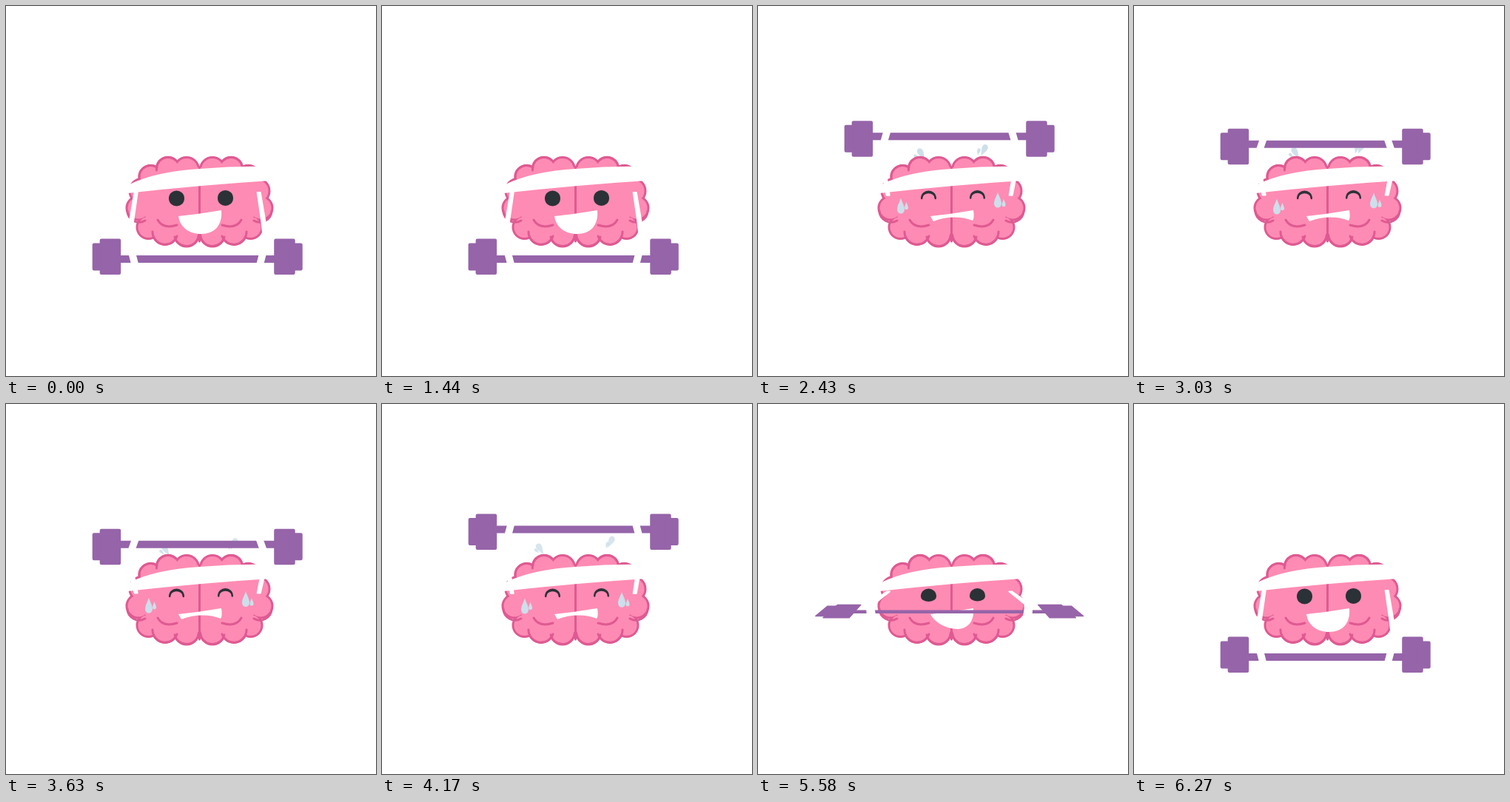
Animation, 500 px wide and 500 px high, one loop 6.3 s. Source, as an HTML page with a canvas:

```html
<!DOCTYPE html>
<html>
<head>
<meta charset="utf-8">
<title>Brain workout</title>
<style>
html, body { margin: 0; width: 100%; height: 100%; overflow: hidden; background: #fff; }
canvas { display: block; width: 500px; height: 500px; }
</style>
</head>
<body>
<canvas id="stage"></canvas>
<script>
const LOOP = 6300, CENTER = 258.7, AXIS = 254, DEPTH = 455, MID = 261.5;
const PINK = '#fe8bb3', ROSE = '#df5a92', PURPLE = '#9664a9', INK = '#2b3237', WATER = '#cddfea';

const canvas = document.getElementById('stage');
const ratio = window.devicePixelRatio || 1;
canvas.width = canvas.height = 500 * ratio;
const ctx = canvas.getContext('2d');

const clamp = v => Math.min(1, Math.max(0, v));
const ramp = (t, from, to) => clamp((t - from) / (to - from));
const smooth = p => (1 - Math.cos(Math.PI * p)) / 2;
const mix = (a, b, k) => a + (b - a) * k;

function fill(path, color) {
  ctx.fillStyle = color;
  ctx.fill(path);
}

function stroke(path, color, width) {
  ctx.strokeStyle = color;
  ctx.lineWidth = width;
  ctx.stroke(path);
}

// Lobes of one brain half: distance from the middle, y, radius
const LOBES = [
  [17.5, 221, 18], [42.5, 220, 17], [66, 231, 17], [78, 250, 18],
  [82.5, 273, 17.5], [69, 299, 17], [46.5, 305.5, 18.5], [17.5, 308.5, 18]
];

function lobes(inset) {
  const path = new Path2D();
  for (const [dx, y, r] of LOBES) {
    for (const x of [MID - dx, MID + dx]) {
      path.moveTo(x + r, y);
      path.arc(x, y, r - inset, 0, 7);
    }
  }
  return path;
}

const outer = lobes(0), inner = lobes(3);
const body = new Path2D();
body.ellipse(MID, 264, 82, 46, 0, 0, 7);

const folds = new Path2D(
  'M205 289 Q212 302 231 296 M164 277 A16 16 0 0 0 188 290' +
  'M198 305 A17 17 0 0 0 231 311 M228 312 A16.500 16.500 0 0 0 260.500 309' +
  'M203.500 222 A15.500 15.500 0 0 1 230 209 M180 232 A15.500 15.500 0 0 1 204 218');
const middle = new Path2D('M261.500 218 V318');
const headband = new Path2D(
  'M164 253 L163 243 C190 229 225 222 262 220 Q310 216 358 217 L357 236 Q262 242 164 253 Z');
const dropShape = new Path2D('M0 -10.500 C2 -4 5 0 5 5 A5 5.500 0 0 1 -5 5 C-5 0 -2 -4 0 -10.500 Z');

function drop(x, y, size, turn = 0) {
  ctx.save();
  ctx.translate(x, y);
  ctx.rotate(turn);
  ctx.scale(size, size);
  fill(dropShape, WATER);
  ctx.restore();
}

function drawBrain() {
  fill(outer, ROSE);
  fill(inner, PINK);
  fill(body, PINK);
  stroke(folds, ROSE, 3);
  ctx.save();
  ctx.translate(2 * MID, 0);
  ctx.scale(-1, 1);
  stroke(folds, ROSE, 3);
  ctx.restore();
  stroke(middle, ROSE, 3);
  fill(headband, '#fff');
}

function drawEye(x, y, open) {
  const k = y + mix(-10.5, 12.4, open), l = x - 9.3, r = x + 9.3, top = y - 12.4;
  const eye = new Path2D(`M${l} ${y} C${l} ${top} ${r} ${top} ${r} ${y} C${r} ${k} ${l} ${k} ${l} ${y} Z`);
  fill(eye, INK);
  stroke(eye, INK, 2.4);
}

const GRIN = [293, 297, 281, 308, 264, 308, 246, 308, 235, 298, 233, 284];
const STRAIN = [292, 282, 292, 288, 290, 290, 274, 284, 256, 284, 237, 291];

function drawMouth(open) {
  const curve = GRIN.map((v, i) => mix(STRAIN[i], v, open));
  fill(new Path2D(`M233 284 Q262 281 291 276 C${curve.join(' ')} Z`), '#fff');
}

// Arms and barbell share one plane that swings around the shoulder line.
function project(x, r, angle, sink) {
  const scale = DEPTH / (DEPTH - r * Math.sin(angle));
  return [CENTER + x * scale, AXIS + r * Math.cos(angle) * scale + sink];
}

function polygon(points) {
  return new Path2D('M' + points.map(p => p.join(' ')).join('L') + 'Z');
}

function drawBarbell(angle, sink) {
  const round = 4 * Math.abs(Math.cos(angle)) + 0.5, half = round / 2;
  const slab = (x0, x1, r0, r1) => {
    const shape = polygon([[x0 + half, r0 + half], [x1 - half, r0 + half],
      [x1 - half, r1 - half], [x0 + half, r1 - half]].map(([x, r]) => project(x, r, angle, sink)));
    fill(shape, PURPLE);
    stroke(shape, PURPLE, round);
  };
  slab(-125, 125, 83, 93);
  slab(-132, -103.5, 60.5, 109);
  slab(103.5, 132, 60.5, 109);
  slab(-142, -125, 66.5, 103.5);
  slab(125, 142, 66.5, 103.5);
}

// Distance from the middle, reach, half width
const ARM = [[83, -2, 2], [89, 36, 2.5], [92, 58, 3], [90, 74, 4], [84, 97, 4]];

function drawArms(angle, sink) {
  const squeeze = 1 - sink / 88;
  for (const side of [-1, 1]) {
    const edge = sign => ARM.map(([x, r, w]) => project(side * (x + sign * w), r * squeeze, angle, 0));
    const shape = polygon([...edge(1), ...edge(-1).reverse()]);
    fill(shape, '#fff');
    stroke(shape, '#fff', 2);
  }
}

function drawSweat(t, alpha) {
  const k = (t - 2430) / 2250;
  ctx.globalAlpha = alpha;
  drop(193, 270 + 4 * k, 1);
  drop(200.5, 270 + 4 * k, 0.5);
  drop(324, 262 + 3 * k, 1);
  drop(332, 266 + 3 * k, 0.5);
  ctx.globalAlpha = 1;
}

function drawSplash(t, alpha) {
  const k = (t - 2430) / 2250;
  ctx.globalAlpha = alpha * mix(1, 0.75, clamp(k));
  drop(221 - 9 * k, 200 - 5 * k, 0.8, 2.6);
  drop(214 - 6 * k, 204 - 7 * k, 0.4, 2.3);
  drop(305 + 5 * k, 195 - 11 * k, 0.8, 3.6);
  drop(298 + 8 * k, 197 - 8 * k, 0.45, 3.4);
  ctx.globalAlpha = 1;
}

function draw(t) {
  const lower = ramp(t, 5335, 6035);
  const lift = t < 5000 ? ramp(t, 1440, 2170) : (1 - lower) ** 2;
  const angle = Math.PI * lift;
  const shake = ramp(t, 2180, 5105) * 9;
  const sink = 12 * (1 - Math.cos(2 * Math.PI * shake));
  const open = 1 - smooth(ramp(t, 1770, 2130)) + smooth(ramp(t, 5330, 5690));
  const wet = ramp(t, 2100, 2300) * (1 - ramp(t, 5050, 5250));

  ctx.setTransform(ratio, 0, 0, ratio, 0, 0);
  ctx.fillStyle = '#fff';
  ctx.fillRect(0, 0, 500, 500);
  ctx.lineCap = ctx.lineJoin = 'round';

  drawSplash(t, wet);
  drawBrain();
  drawEye(230.5, 260, open);
  drawEye(296.5, 259.5, open);
  drawMouth(open);
  drawSweat(t, wet);
  drawBarbell(angle, sink);
  drawArms(angle, sink);
}

const start = performance.now();
function tick() {
  draw((performance.now() - start) % LOOP);
  requestAnimationFrame(tick);
}
tick();
</script>
</body>
</html>
```
